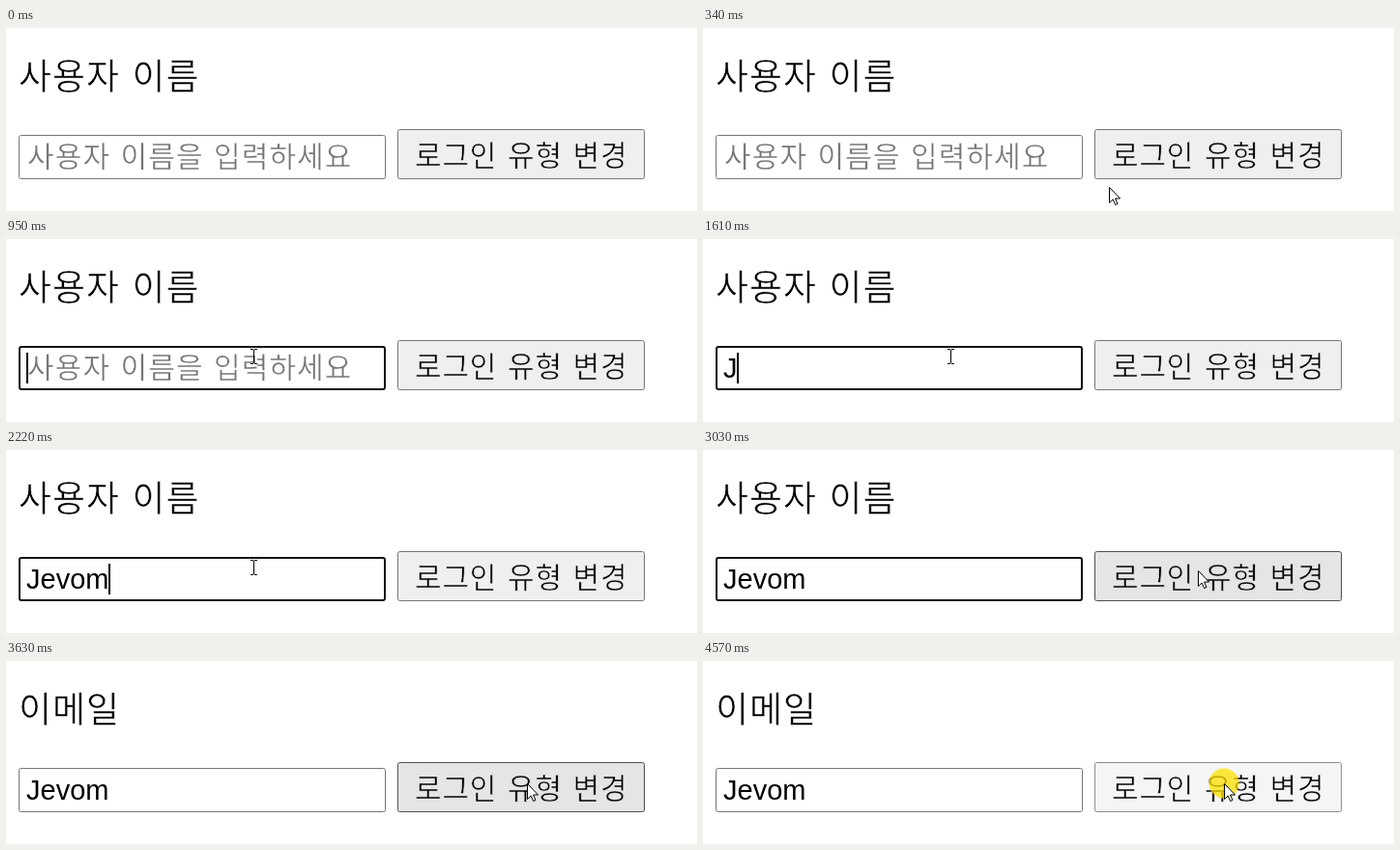
An HTML page that plays this animation: 715x190 px, repeating every 4.64 s.

```html
<!DOCTYPE html>
<html lang="ko">
<head>
<meta charset="utf-8">
<style>
  html, body { margin: 0; width: 100%; height: 100%; overflow: hidden; background: #fff; }
  svg { display: block; width: 715px; height: 190px; }
  /* A thin stroke in the background colour gives the Hangul its lighter weight. */
  text { font: 300 30px "Noto Sans CJK KR", "Noto Sans CJK", sans-serif; letter-spacing: .8px; word-spacing: 1.6px; white-space: pre; stroke: #fff; stroke-width: .6px; }
  #title { font-size: 37px; letter-spacing: 1px; word-spacing: 1px; }
  #placeholder { fill: #757575; letter-spacing: 1.1px; word-spacing: .9px; stroke-width: .4px; }
  #typed { font: 29px "Liberation Sans", Arial, sans-serif; letter-spacing: 0; stroke: none; }
  #field { fill: #fff; }
</style>
</head>
<body>
<svg viewBox="0 0 715 190">
  <text id="title" x="13" y="63.5"></text>
  <rect id="field" rx="2"/>
  <text id="placeholder" x="22" y="144">사용자 이름을 입력하세요</text>
  <text id="typed" x="21" y="144"></text>
  <rect id="caret" y="118" width="2" height="32"/>
  <rect id="button" x="405.5" y="105.5" width="255" height="51" rx="2"/>
  <text id="label" x="423" y="143">로그인 유형 변경</text>
  <g id="pointer">
    <circle id="press" r="15.5" fill="#fde000" opacity=".75"/>
    <path id="beam" d="M-3 -7.5H0M1 -7.5H4M.5 -7V7M-3 7.5H0M1 7.5H4" fill="none" stroke="#000"/>
    <path id="arrow" d="M.5 .5V16.5L4.2 13L6.7 18.5L9 17.5L6.6 12H11.6Z" fill="#fff" stroke="#000"/>
  </g>
</svg>
<script>
const LOOP = 4640;
const NAME = 'Jevom';
const KEY_TIMES = [1610, 1740, 2020, 2090, 2220];
const BLUR = 3500;

// Pointer stops: time, x, y
const STOPS = [
  [130, 653, 176], [200, 596, 174], [270, 510, 171], [340, 420, 165],
  [400, 345, 146], [470, 290, 128], [540, 262, 120], [610, 256, 122],
  [740, 257, 122], [880, 256, 122],
  [2820, 270, 119], [2890, 352, 110], [2960, 450, 114], [3030, 512, 125],
  [3100, 532, 128], [3170, 539, 127]
];

const el = Object.fromEntries([...document.querySelectorAll('[id]')].map(e => [e.id, e]));
const between = (t, a, b) => t >= a && t < b;
const show = (e, on) => e.setAttribute('visibility', on ? 'visible' : 'hidden');
const set = (e, attrs) => Object.entries(attrs).forEach(([k, v]) => e.setAttribute(k, v));

function drawField(t, hover) {
  const focused = between(t, 880, BLUR);
  set(el.field, focused
    ? { x: 14, y: 112, width: 378, height: 44, stroke: '#101010', 'stroke-width': 2 }
    : { x: 13.5, y: 111.5, width: 379, height: 45, stroke: hover ? '#4f4f4f' : '#767676', 'stroke-width': 1 });

  const text = NAME.slice(0, KEY_TIMES.filter(k => t >= k).length);
  el.typed.textContent = text;
  show(el.placeholder, !text);

  const width = text ? el.typed.getComputedTextLength() : 0;
  el.caret.setAttribute('x', Math.floor(21 + width));
  show(el.caret, focused && !between(t, 1410, 1610) && !between(t, 2820, 3300));
}

function drawButton(hover, active) {
  const [fill, stroke] = active ? ['#f5f5f5', '#8d8d8d'] : hover ? ['#e5e5e5', '#4f4f4f'] : ['#efefef', '#767676'];
  set(el.button, { fill, stroke });
  el.label.style.stroke = fill;
}

function draw(t) {
  const stop = STOPS.findLast(s => t >= s[0]);
  const [, x, y] = stop || [0, -99, -99];
  const overField = between(x, 13, 393) && between(y, 111, 157);
  const overButton = between(x, 405, 661) && between(y, 105, 157);
  // The I-beam lingers just above the field's edge.
  const beam = overField || (x < 393 && between(y, 105, 157));
  const pressed = between(t, 880, 950) || between(t, BLUR, 3630) || t >= 4570;

  el.title.textContent = t < 3630 ? '사용자 이름' : '이메일';
  drawField(t, overField);
  drawButton(overButton, overButton && pressed);
  el.pointer.setAttribute('transform', `translate(${x} ${y})`);
  show(el.press, pressed);
  show(el.beam, beam);
  show(el.arrow, !beam);
}

const start = performance.now();
function frame() {
  draw((performance.now() - start) % LOOP);
  requestAnimationFrame(frame);
}
frame();
</script>
</body>
</html>
```
